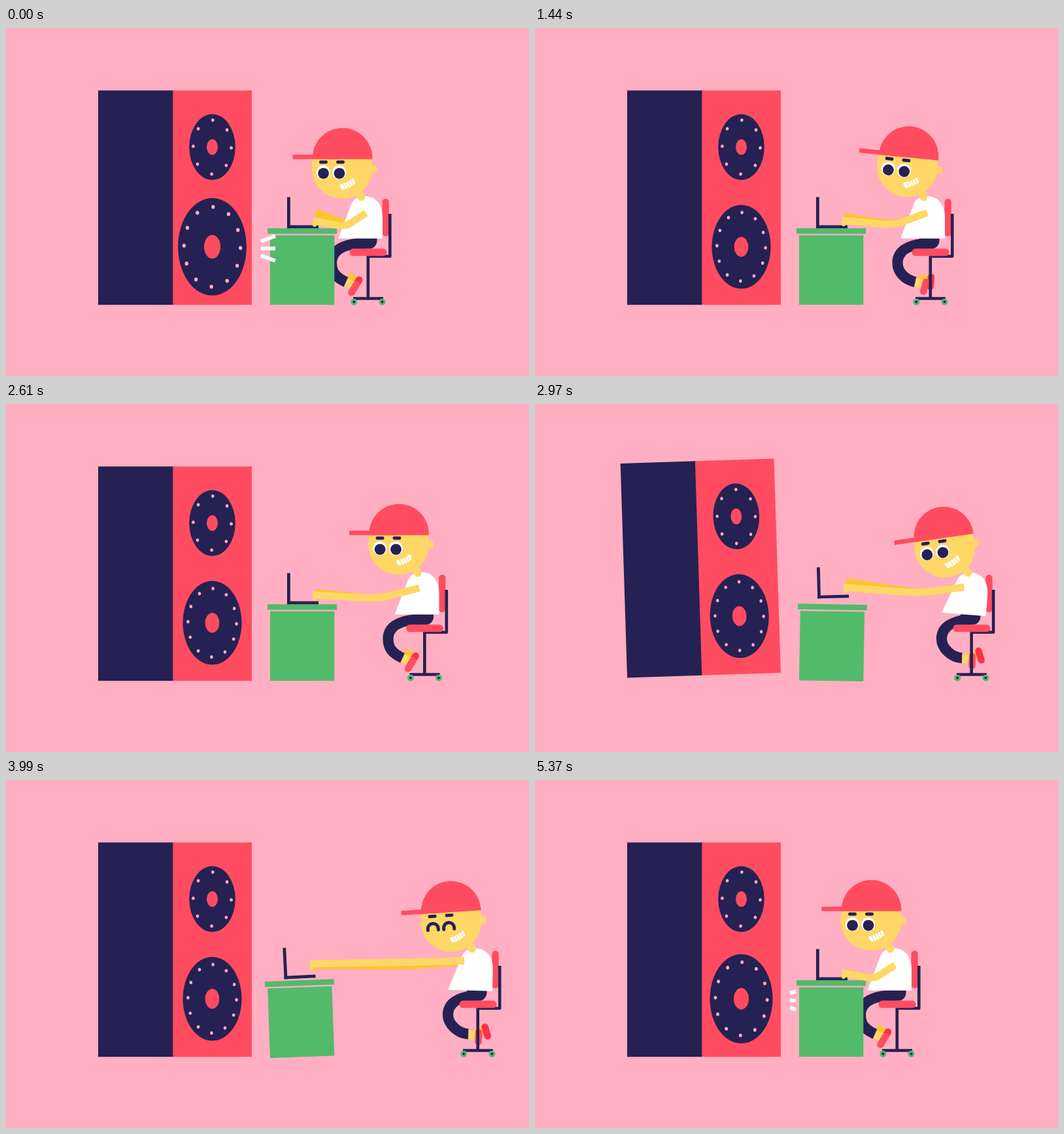
Write an HTML page that moves like this. It is 800x532 px and loops after 5400 ms.

```html
<!DOCTYPE html>
<html lang="en">
<head>
<meta charset="utf-8">
<title>Loud speaker</title>
<style>
  html, body { margin: 0; width: 100%; height: 100%; overflow: hidden; background: #ffafc1; }
  svg { display: block; width: 100vw; height: 100vh; }
</style>
</head>
<body>
<svg id="stage" viewBox="0 0 800 532"></svg>
<script>
const NAVY = '#262153', RED = '#ff4c60', PINK = '#ffafc1', GREEN = '#52ba6b',
      SKIN = '#fed766', SHADE = '#fdc42e', SHOE = '#ff2f48', WHITE = '#fff';
const LOOP = 5400, BEAT = 24;
const stage = document.getElementById('stage');

// ---- motion ----
const mix = (a, b, u) => a + (b - a) * u;
const clamp = u => Math.min(1, Math.max(0, u));
// Rises from 0 to 1 and back between steps a and b
const hump = (k, a, b) => Math.sin(Math.PI * clamp((k - a) / (b - a)));
const smooth = u => u * u * (3 - 2 * u);
const easeOut = u => 1 - (1 - u) * (1 - u);
// Steps since a hit, slightly negative just before it
const since = (k, at) => (k - at + BEAT + 4) % BEAT - 4;

// ---- drawing ----
const n = v => +v.toFixed(2);
const rect = (x, y, w, h, fill, r = 0) =>
  `<rect x="${x}" y="${y}" width="${w}" height="${h}" rx="${r}" fill="${fill}"/>`;
const oval = (x, y, rx, ry, fill) =>
  `<ellipse cx="${n(x)}" cy="${n(y)}" rx="${n(rx)}" ry="${n(ry)}" fill="${fill}"/>`;
const dot = (x, y, r, fill) => oval(x, y, r, r, fill);
const shape = (d, fill) => `<path d="${d}" fill="${fill}"/>`;
const line = (d, color, w, cap = 'butt') =>
  `<path d="${d}" fill="none" stroke="${color}" stroke-width="${w}" stroke-linecap="${cap}" stroke-linejoin="round"/>`;
const seg = (x1, y1, x2, y2) => `M${n(x1)} ${n(y1)}L${n(x2)} ${n(y2)}`;
const move = (x, y, body) => `<g transform="translate(${n(x)} ${n(y)})">${body}</g>`;
const turn = (a, x, y, body) => `<g transform="rotate(${n(a)} ${x} ${y})">${body}</g>`;

// ---- speaker ----
function cone(x, y, rx, ry, count, d) {
  let s = oval(0, 0, rx, ry, NAVY);
  for (let i = 0; i < count; i++) {
    let a = i / count * 2 * Math.PI;
    a += 0.07 * Math.sin(2 * a) + 0.03;
    s += oval(rx * 0.825 * Math.sin(a), -ry * 0.82 * Math.cos(a), 2.3, 2.6, PINK);
  }
  s += oval(0, 0, rx * 0.24, ry * 0.24, RED);
  const size = 1 + 0.167 * hump(d, -1.3, 1) - 0.2 * hump(d, 0, 2);
  return `<g transform="translate(${x} ${y}) scale(${size.toFixed(3)})">${s}</g>`;
}

function speaker(k) {
  const tilt = -6 * hump(k, 0, 5) - 2 * hump(k, 3.5, 9);
  const lift = 33 * hump(k, 0, 4) + 9.8 * hump(k, 3, 9);
  return move(0, -lift, turn(tilt, 258.5, 423,
    rect(141, 95.5, 115, 327.7, NAVY) + rect(255.3, 95.5, 120.7, 327.7, RED) +
    cone(315.5, 182, 35.3, 50.3, 8, since(k, 4)) +
    cone(315.5, 334.5, 45, 64, 12, since(k, 0))));
}

// Three short strokes that grow, then shrink away from their start
function burst(d, x, y, gap) {
  if (Math.abs(d) > 1) return '';
  const a = 11 * Math.max(0, d), b = 22 + 13 * Math.min(0, d);
  return [-1, 0, 1].map(i => line(
    seg(x + a, y + i * (gap + a * 0.36), x + b, y + i * (gap + b * 0.36)), WHITE, 5.6)).join('');
}

// ---- desk ----
function deskPose(k) {
  return {
    tilt: 1.1 * hump(k, 3, 9) - 2.1 * hump(k, 8, 12),
    lift: 15 * hump(k, 2, 7),
    hop: 10.4 * hump(k, 5, 10.5)
  };
}

function desk(p) {
  const laptop = rect(430, 258.5, 4.8, 47.7, NAVY) + rect(430, 301.5, 48, 4.7, NAVY);
  return move(0, -p.lift, turn(p.tilt, 453, 423,
    rect(404, 317, 98.3, 106.2, GREEN) + rect(400, 306.2, 106, 8.4, GREEN) +
    move(0, -p.hop, turn(-p.hop * 0.25, 454, 304, laptop))));
}

// ---- man ----
// Each beat rolls the chair on to the next stop; the last one snaps it home
const STOPS = [0, 21.5, 51, 86.5, 121, 169.5];

function slide(c, k) {
  if (c < 5) return mix(STOPS[c], STOPS[c + 1], easeOut(clamp((k - 1) / 11)));
  return STOPS[5] * (1 - smooth(clamp(k / 4.5))) - 11.5 * hump(k, 4, 6) + 17 * hump(k, 6, 17);
}

function pose(c, k) {
  return c < 5 ? {
    lean: 4.5 * hump(k, 2, 11),
    nod: 7 * hump(k, 11.4, 20) - 8.4 * hump(k, 1, 11.4),
    drop: 0
  } : {
    lean: -4.5 * hump(k, 2, 12),
    nod: 44 * hump(k, 2, 10),
    drop: 108 * hump(k, 1, 9)
  };
}

function chair() {
  const wheel = x => dot(x, 418.7, 5, GREEN) + dot(x, 418.7, 1.9, NAVY);
  return rect(575.5, 261, 10.3, 57.5, RED, 5) +
    line('M587.3 284V349H553.8V413', NAVY, 4.6) +
    line('M531 413.5H577', NAVY, 4.4) +
    wheel(532.3) + wheel(575.5) +
    rect(525.5, 337.3, 57, 11.2, RED, 5.5);
}

const foot = (x, y, a, skin, shoe) => move(x, y, turn(a, 0, 0,
  line('M-2 -1L12 6', skin, 13) + line('M16 4L8.5 16.5', shoe, 10.5, 'round')));

function legs(s) {
  const knee = n(498 + 10.5 * s), ankle = n(520 + 20 * s);
  return foot(524 + 28 * s, 381 + 6 * s, -50 * s, SHADE, SHOE) +
    foot(ankle, 388 + 2 * s, -30 * s, SKIN, RED) +
    line(`M550 329.7H${knee + 39}C${knee + 15} 332 ${knee} 342 ${knee} 359` +
      `C${knee} 373 ${ankle - 16} ${n(381 + 7 * s)} ${ankle} 388.3`, NAVY, 16.2) +
    shape('M537 321.6H567.5V326Q566 337.8 553 337.8H537Z', NAVY);
}

function face(shut) {
  const eye = x => shut
    ? line(`M${x - 8} 226V224A8 8 0 0 1 ${x + 8} 224V226`, NAVY, 5, 'round')
    : dot(x - 0.3, 220.7, 10.6, WHITE) + dot(x, 222.3, 8.4, NAVY);
  const brow = x => rect(x, 202.5, 13, 5, NAVY, 2.4);
  let gaps = '';
  for (let x = 516.5; x < 531; x += 4.5) gaps += line(`M${x} 233V246`, SKIN, 1);
  return eye(485.6) + eye(510) + brow(479) + brow(505) +
    turn(-26, 522.5, 239, shape('M511.5 234Q522.5 236.5 534 234Q535.5 239 533 243' +
      'Q522.5 245.5 512 243Q509.5 238 511.5 234Z', WHITE) + gaps);
}

function head(shut) {
  return line('M537 247L543.5 258.5', SKIN, 11.5, 'round') +
    dot(562, 215.3, 6, SKIN) + dot(514, 214.3, 46.6, SKIN) + face(shut) +
    shape('M468.8 200.4V199A45.8 46.3 0 0 1 560.4 199V200.4Z', RED) +
    rect(438.5, 193.6, 70, 6.8, RED);
}

function arm(sx, sy, hx, hy, sag, color) {
  const ex = mix(hx, sx, 0.61), ey = mix(hy, sy, 0.61) + sag;
  const near = (x, y) => `${n(mix(ex, x, 0.25))} ${n(mix(ey, y, 0.25))}`;
  return line(`M${n(sx)} ${n(sy)}L${near(sx, sy)}Q${n(ex)} ${n(ey)} ${near(hx, hy)}L${n(hx)} ${n(hy)}`, color, 11) +
    line(seg(hx + 2.5, hy - 2, hx + 2, hy + 6), color, 6, 'round');
}

function draw(f) {
  const c = Math.floor(f / BEAT), k = f % BEAT;
  const x = slide(c, k), table = deskPose(k), { lean, nod, drop } = pose(c, k);
  const shut = c === 4 && k > 1 && k < 21;

  // Hands stay on the laptop while the shoulders roll away
  const reach = (x / 166) ** 2;
  const hx = 470 + table.tilt * 2.2;
  const hy = 295 - table.lift - table.hop - 11 * reach;
  const sx = x + 550.5 - 17 * reach + drop * 0.04;
  const sy = 283 - 6.5 * reach + drop * 0.16;
  const sag = 16 - 15 * reach + drop;
  const tap = (4 + 9 * Math.cos(2 * Math.PI * k / 7)) * Math.exp(-k / 16);

  const shirt = shape('M508 321.7L528 270Q533 257 549 257C566 257 576 271 576 289V321.7Z', WHITE);

  stage.innerHTML = rect(0, 0, 800, 532, PINK) + speaker(k) +
    move(x, 0, legs(hump(k, 0, 17)) + chair()) +
    arm(sx - 4, sy + 2, hx + 4, hy - tap, sag * 0.7 + 4, SHADE) +
    move(x, 0, turn(lean, 541.5, 321, shirt) +
      move(lean * 1.1, 0, turn(nod, 541, 258, head(shut)))) +
    desk(table) +
    arm(sx, sy, hx, hy, sag, SKIN) +
    burst(since(k, 0), 390, 337, 11) + burst(since(k, 4), 388, 170, 14);
}

// Four drawings per 150 ms, the first one held double
let shown = -1;
function tick() {
  const t = performance.now() % LOOP;
  const f = Math.floor(t / 150) * 4 + Math.max(0, Math.floor(t % 150 / 30) - 1);
  if (f !== shown) draw(shown = f);
  requestAnimationFrame(tick);
}
tick();
</script>
</body>
</html>
```
